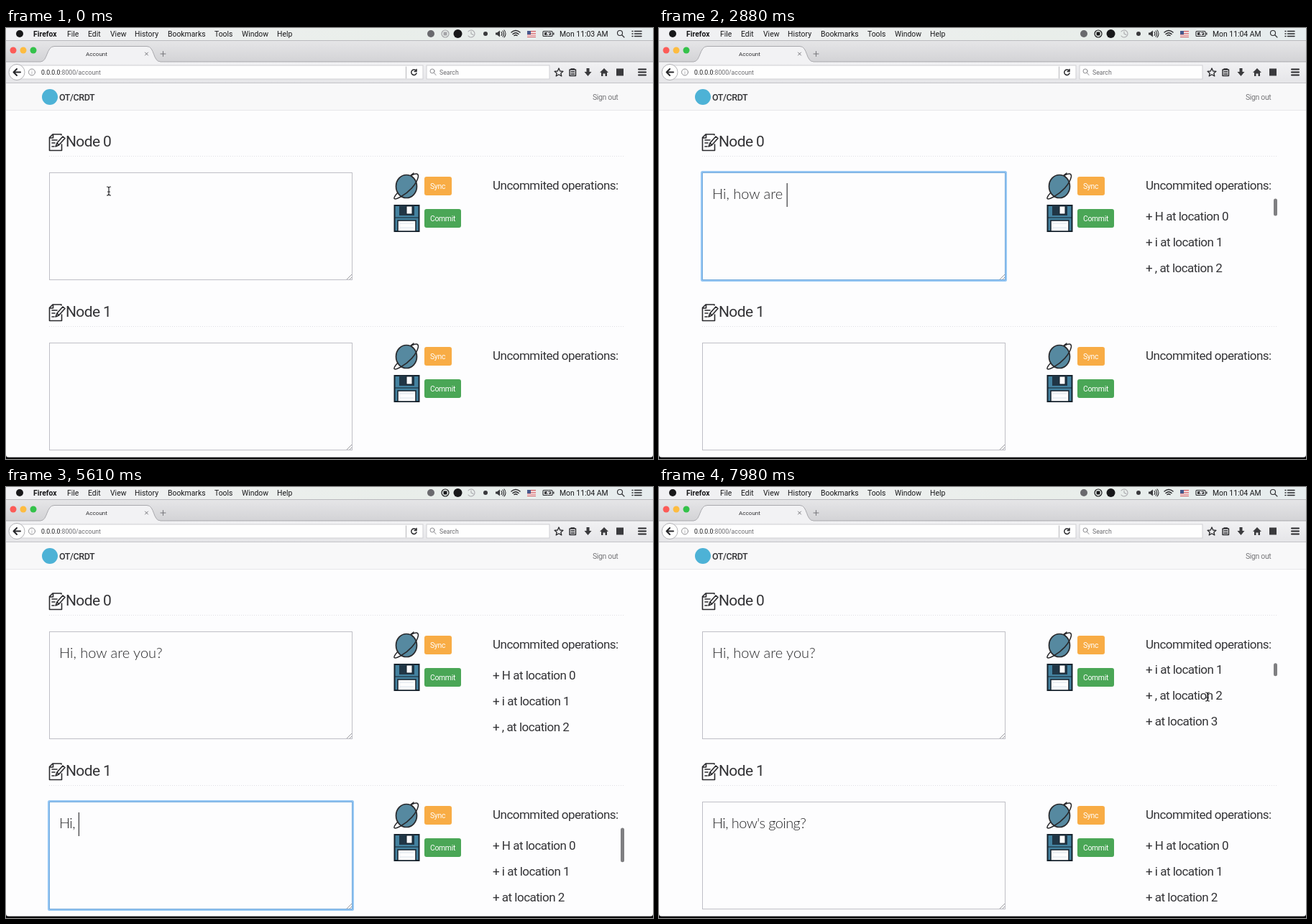
Animation, 900 px wide and 600 px high, one loop 8000 ms. Source, as an HTML page:

```html
<!DOCTYPE html>
<html lang="en">
<head>
<meta charset="utf-8">
<title>Account</title>
<style>
html, body { margin: 0; width: 100%; height: 100%; overflow: hidden; background: #fdfdfe; }
svg { display: block; width: 100%; height: 100%; }
text { font-family: Roboto, "Noto Sans", sans-serif; fill: #333336; white-space: pre; }
.menu { font-size: 10.4px; fill: #18181a; }
.tool { font-size: 8.7px; fill: #6c6c70; }
.page { letter-spacing: -.03em; }
.op { font-size: 17px; }
.btn { font-size: 10.4px; fill: #fff; }
.note { font: 300 20px Lato, "Open Sans", sans-serif; fill: #28282a; }
.line { fill: none; stroke: #29292c; stroke-linecap: round; stroke-linejoin: round; }
.dark { fill: #3a3a3d; }
</style>
</head>
<body>
<svg viewBox="0 0 900 600" id="stage">
  <defs>
    <linearGradient id="menuFill"><stop offset="0" stop-color="#f1f1f4"/><stop offset=".6" stop-color="#e9eeea"/><stop offset="1" stop-color="#e6ecee"/></linearGradient>
    <linearGradient id="titleFill" x2="0" y2="1"><stop offset="0" stop-color="#e6e6e8"/><stop offset="1" stop-color="#d3d3d6"/></linearGradient>
    <linearGradient id="toolFill" x2="0" y2="1"><stop offset="0" stop-color="#f2f2f4"/><stop offset="1" stop-color="#e5e5e8"/></linearGradient>
    <clipPath id="listClip"><rect x="670" y="238" width="182" height="106"/></clipPath>
    <g id="panel">
      <g class="line" stroke-width="1.6">
        <path d="M77 149V148H65L60.500 152.500V170.500H77.500V162M60.500 153H65.500V148M64 156H71M64 160H68M64 165H67"/>
        <path d="M69 165L71 160L79 151L82 153.500L73.500 163ZM71 160L73.500 163" fill="#fdfdfe"/>
      </g>
      <path d="M60 178.500H861" stroke="#dedee3" stroke-dasharray="1 2"/>
      <g class="line" stroke-width="1.7">
        <ellipse cx="557" cy="220.500" rx="14.500" ry="16" fill="#5689a0"/>
        <path d="M545 229C536 239 540 240 549 235C560 229 571 218 573.500 207C574 202 570 202 564 205M567 202L563 205L566 208" stroke-width="1.5"/>
      </g>
      <rect x="540.500" y="247" width="34" height="36" fill="#4482a0" stroke="#16222c" stroke-width="2"/>
      <rect x="547" y="247" width="21" height="14" fill="#203646"/>
      <rect x="557" y="248" width="8" height="11" fill="#fdfdfe" stroke="#16222c"/>
      <path d="M541 264H574" stroke="#16222c"/>
      <rect x="545" y="268" width="25" height="15" fill="#fdfdfe" stroke="#16222c" stroke-width="1.500"/>
      <path d="M548 272H567M548 278H567" stroke="#dce4ec"/>
      <rect x="582" y="207" width="38" height="26" rx="3" fill="#f8ac45"/>
      <rect x="582" y="252" width="51" height="26" rx="3" fill="#4aa656"/>
      <text class="page btn" x="590" y="223.500">Sync</text>
      <text class="page btn" x="590" y="268.500">Commit</text>
      <text class="page" x="677" y="225" font-size="17">Uncommited operations:</text>
    </g>
  </defs>

  <rect width="900" height="600" fill="#fdfdfe"/>
  <rect width="900" height="17" fill="url(#menuFill)"/>
  <rect y="17" width="900" height="30" fill="url(#titleFill)"/>
  <path d="M0 17.500H900" stroke="#b9b9bd"/>
  <rect y="47" width="900" height="30" fill="url(#toolFill)"/>
  <path d="M0 47H48C58 47 56 25.500 67 25.500H196C207 25.500 204 47 215 47H900" fill="#f2f2f4" stroke="#a9a9ad"/>
  <path d="M49 48H214" stroke="#f2f2f4" stroke-width="2"/>
  <path d="M0 76.500H900" stroke="#c4c4c8"/>
  <rect y="77" width="900" height="37" fill="#f8f8f9"/>
  <path d="M0 114.500H900" stroke="#e7e7ea"/>

  <g id="menus"></g>
  <circle cx="19" cy="8" r="5" fill="#18181a"/>
  <circle cx="591" cy="8" r="5" fill="#6a6a6e"/>
  <g id="record"><circle cx="611" cy="8" r="5" fill="none" stroke="currentColor" stroke-width="1.200"/><rect x="608.500" y="5.500" width="5" height="5" rx="1" fill="currentColor"/></g>
  <circle cx="628.500" cy="8" r="6" fill="#18181a"/>
  <g class="line" stroke-width="1.100">
    <path d="M643 5A5 5 0 1 1 643 11M647 5V8L650 9.500" stroke="#a9a9ad"/>
    <path d="M689 5.500Q691 8 689 10.500M691 4Q694 8 691 12M693 3Q697 8 693 13"/>
    <path d="M703 6Q709 1 715 6M705 8.500Q709 5 713 8.500M707 10.500Q709 9 711 10.500" stroke-width="1.500"/>
    <rect x="747" y="4.500" width="13" height="7" rx="1"/>
    <circle cx="854" cy="7" r="3.500"/><path d="M857 10L860 13"/>
    <path d="M871 4.500H872M871 8H872M871 11.500H872M874.500 4.500H884M874.500 8H884M874.500 11.500H884" stroke-width="1.400"/>
  </g>
  <circle cx="667" cy="8" r="3" class="dark"/>
  <path class="dark" d="M681 6.500H683L687 3.500V12.500L683 9.500H681ZM761 6.500H762.500V9.500H761ZM749 6H758V10H749Z"/>
  <path d="M754.500 4L751.500 9H754L753 12L757 7H754Z" fill="#f1f1f4"/>
  <rect x="725" y="4" width="12" height="9" fill="#f8f4f4"/>
  <path d="M725 4.700H737M725 7.500H737M725 10H737M725 12.500H737" stroke="#d0555a" stroke-width="1.200"/>
  <rect x="725" y="4" width="5" height="5" fill="#46588c"/>
  <text class="menu" id="clock" x="770" y="12"></text>

  <circle cx="10" cy="31" r="4.500" fill="#fc5b57"/>
  <circle cx="24" cy="31" r="4.500" fill="#fdbc40"/>
  <circle cx="38" cy="31" r="4.500" fill="#34c24a"/>
  <text x="126" y="39" text-anchor="middle" font-size="8.100">Account</text>
  <path class="line" d="M193.500 34L197.500 38M197.500 34L193.500 38M215 36H222M218.500 32.500V39.500" style="stroke:#77777b"/>

  <rect x="20" y="52" width="560" height="19" fill="#fefefe" stroke="#d0d0d4"/>
  <rect x="585" y="52" width="171" height="19" fill="#fefefe" stroke="#d0d0d4"/>
  <circle cx="15" cy="61.500" r="11" fill="#fefefe" stroke="#b0b0b4"/>
  <path class="line" d="M20 61.500H11M15 57L10.500 61.500L15 66" stroke-width="2"/>
  <g class="line" stroke-width="1">
    <g style="stroke:#8e8e92"><circle cx="36" cy="61.500" r="4.500"/><path d="M36 61V64M36 59V59.200M556.500 54V70" stroke="#b8b8bc"/><circle cx="593" cy="60" r="3"/><path d="M595.500 62.500L598 65.500"/></g>
    <path d="M570 59A3.700 3.700 0 1 0 571 63M571 57.500V60.500H568" stroke-width="1.500"/>
    <path d="M769 56L770.700 60L775 60.300L771.800 63L772.800 67L769 64.800L765.200 67L766.200 63L763 60.300L767.300 60Z" stroke-width="1.300"/>
    <path d="M784 58H792.500V66.500H784ZM786 57H790.500M786 61H790.500M786 64H790.500" stroke-width="1.400"/>
    <path d="M880 57.500H890M880 61.500H890M880 65.500H890" stroke-width="2"/>
  </g>
  <path class="dark" d="M807.500 56H811.500V61H814.500L809.500 67L804.500 61H807.500ZM832 56L838 62H836V67H833.500V63.500H830.500V67H828V62H826Z"/>
  <rect class="dark" x="849" y="56.500" width="10" height="10"/>
  <text class="tool" x="49" y="65" font-size="8.600"><tspan fill="#1c1c1e">0.0.0.0</tspan>:8000/account</text>
  <text class="tool" x="603" y="65">Search</text>

  <circle cx="61" cy="96" r="11" fill="#4db2d6"/>
  <text class="page" x="74" y="100.500" font-size="12.500" font-weight="500">OT/CRDT</text>
  <text class="page" x="816" y="99.500" font-size="10.400" style="fill:#77777a">Sign out</text>

  <g id="nodes"></g>
  <path d="M0 597.500H900" stroke="#a0a0a4"/>
  <path d="M0 594Q0 598 4 598H896Q900 598 900 594V600H0Z" fill="#08080a"/>
  <g id="mouse">
    <path id="beam" class="line" stroke-width="1.200" d="M-2.500 -6Q0 -6 0 -4Q0 -6 2.500 -6M0 -4V4M-2.500 6Q0 6 0 4Q0 6 2.500 6M-1.500 1H1.500"/>
    <path id="arrow" d="M0 0V12L3 9.300L5 13.500L7 12.600L5 8.600H9Z" fill="#111" stroke="#fff" stroke-width=".8"/>
  </g>
</svg>
<script>
const LOOP = 8000, KEY = 118, ROW = 36.3, VIEW = 102, BLINK = 500;
const FOCUS_0 = 600, FOCUS_1 = 3750, BLUR = 7450;
const $ = id => document.getElementById(id);
const clamp = v => Math.max(0, Math.min(1, v));
const ease = v => { v = clamp(v); return v * v * (3 - 2 * v); };
const show = (el, on) => { el.style.display = on ? '' : 'none'; };

const menus = { Firefox: 38, File: 85, Edit: 114, View: 145, History: 179, Bookmarks: 225, Tools: 290, Window: 328, Help: 377 };
$('menus').innerHTML = Object.entries(menus).map(([label, x]) =>
  `<text class="menu" x="${x}" y="12"${label === 'Firefox' ? ' font-weight="700"' : ''}>${label}</text>`).join('');

// "<" stands for the backspace key.
const nodes = [
  { keys: 'Hi, how are you?', start: 1520, focus: FOCUS_0, blur: FOCUS_1, spacing: 0 },
  { keys: "Hi <, how's going?", start: 4990, focus: FOCUS_1, blur: BLUR, spacing: -.6 }
];

$('nodes').innerHTML = nodes.map((node, i) => `
  <g transform="translate(0 ${i * 237})">
    <use href="#panel"/>
    <text class="page" x="83" y="164.500" font-size="21">Node ${i}</text>
    <rect x="60.500" y="201.500" width="421" height="149" fill="#fdfdfe" stroke="#bfbfc6"/>
    <g id="glow${i}" fill="none">
      <rect x="59.500" y="200.500" width="423" height="151" rx="1" stroke="#94c6f3" stroke-width="3"/>
      <rect x="60.500" y="201.500" width="421" height="149" stroke="#72a9dc"/>
    </g>
    <path d="M474 350L481 343M478 350L481 347" stroke="#9b9b9f"/>
    <text class="note" id="note${i}" x="74" y="238" style="letter-spacing:${node.spacing}px"></text>
    <rect class="dark" id="caret${i}" y="216" width="1.200" height="33"/>
    <g clip-path="url(#listClip)"><g id="list${i}"></g></g>
    <rect id="thumb${i}" x="855" width="5" rx="2.500" fill="#7f7f82"/>
  </g>`).join('');

function replay(keys) {
  let text = '';
  const ops = [...keys].map(key => {
    if (key === '<') {
      text = text.slice(0, -1);
      return `- at location ${text.length}`;
    }
    text += key;
    return `+ ${key === ' ' ? '' : key + ' '}at location ${text.length - 1}`;
  });
  return { text, ops };
}

function drawNode(node, i, t) {
  const count = Math.max(0, Math.min(node.keys.length, Math.floor((t - node.start) / KEY) + 1));
  const note = $('note' + i);
  if (node.count !== count) {
    node.count = count;
    const { text, ops } = replay(node.keys.slice(0, count));
    note.textContent = text;
    $('list' + i).innerHTML = ops.map((op, row) =>
      `<text class="page op" x="677" y="${267.500 + row * ROW}">${op}</text>`).join('');
  }

  const focused = t >= node.focus && t < node.blur;
  const lastKey = node.start + (count - 1) * KEY;
  const since = t - (count ? lastKey : node.focus);
  show($('glow' + i), focused);
  show($('caret' + i), focused && Math.floor(since / BLINK) % 2 === 0);
  $('caret' + i).setAttribute('x', 74 + (count ? note.getComputedTextLength() : 0));

  const scroll = i === 0 ? 44 * ease((t - 7600) / 340) : 0;
  $('list' + i).setAttribute('transform', `translate(0 ${-scroll})`);
  const content = Math.max(1, count) * ROW;
  const thumb = $('thumb' + i);
  thumb.setAttribute('y', 237.500 + scroll * VIEW / content);
  thumb.setAttribute('height', VIEW * VIEW / content);
  thumb.style.opacity = count < 4 ? 0 : scroll > 0 ? 1 : 1 - clamp((t - lastKey - 650) / 200);
}

function drawMouse(t) {
  const down = ease((t - 3420) / 280), across = ease((t - 7120) / 450);
  const x = 143 - 5 * down + 625 * across, y = 227 + 248 * down - 183 * across;
  const visible = t < 1520 || (t > 3420 && t < 4990) || t > 7120;
  const inBox = x > 60 && x < 482 && ((y > 201 && y < 351) || (y > 438 && y < 588));
  show($('mouse'), visible);
  show($('beam'), inBox || across === 1);
  show($('arrow'), !inBox && across < 1);
  $('mouse').setAttribute('transform', `translate(${x} ${y})`);
}

function draw(now) {
  const t = now % LOOP;
  $('clock').textContent = `Mon 11:0${t < 2000 ? 3 : 4} AM`;
  $('record').style.color = t < 300 ? '#a3a3a7' : '#18181a';
  nodes.forEach((node, i) => drawNode(node, i, t));
  drawMouse(t);
}

const begin = performance.now();
function tick() {
  draw(performance.now() - begin);
  requestAnimationFrame(tick);
}
tick();
</script>
</body>
</html>
```
